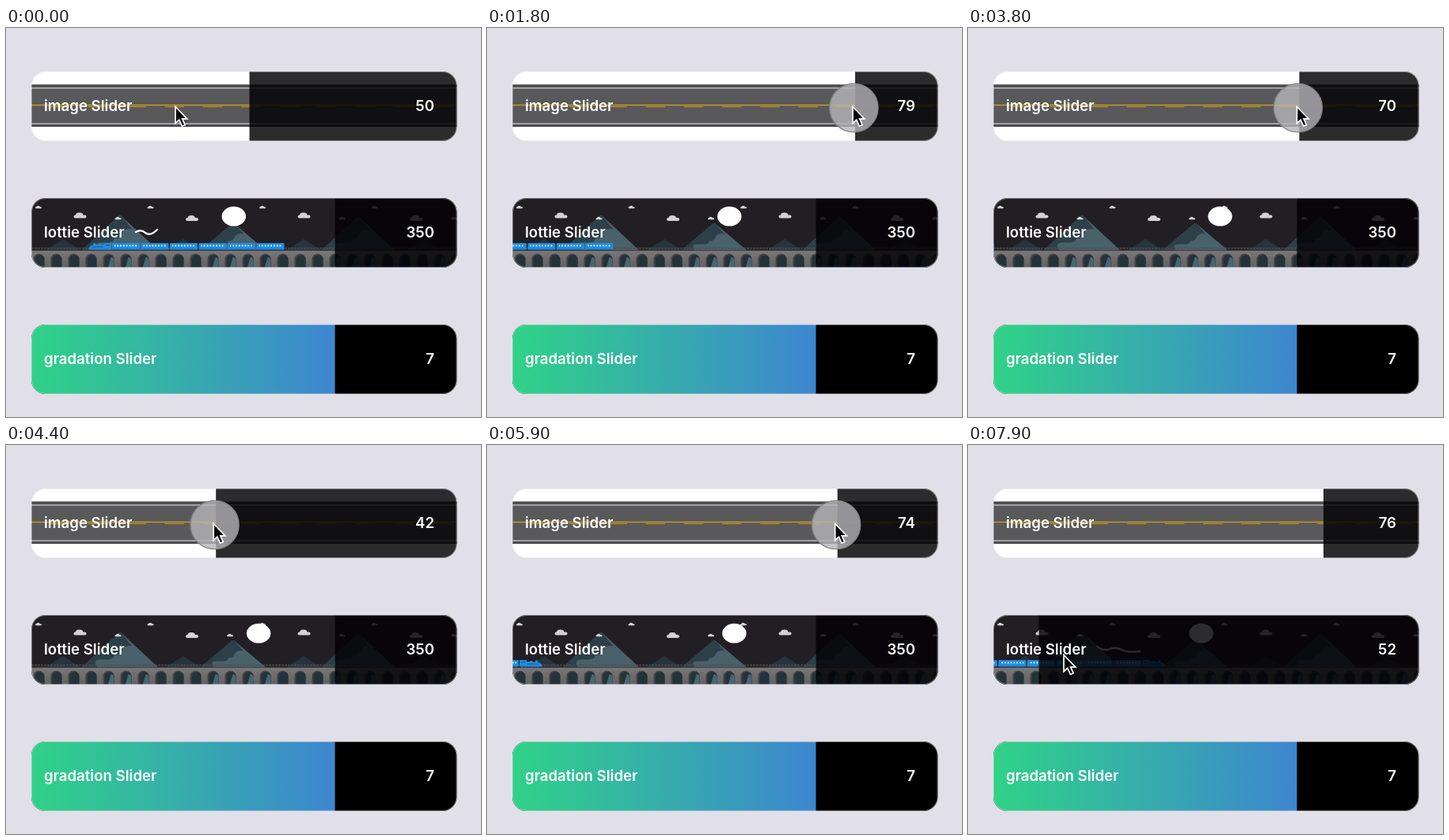
Write an HTML page that moves like this. It is 600 px wide and 492 px high and loops after 8 s.

```html
<!DOCTYPE html>
<html lang="en">
<head>
<meta charset="utf-8">
<title>Sliders</title>
<style>
  html, body { margin: 0; width: 100%; height: 100%; overflow: hidden; background: #e1dfe8; }
  svg { display: block; width: 100vw; height: 100vh; }
  text { font: 600 18.6px Inter, "Liberation Sans", sans-serif; fill: #fff; }
  .value { text-anchor: end; }
</style>
</head>
<body>
<svg viewBox="0 0 600 492">
  <defs>
    <clipPath id="card"><rect x="32" width="537.5" height="88" rx="18"/></clipPath>
    <rect id="rim" x="32.5" y=".5" width="536.5" height="87" rx="17.5" fill="none" stroke="#e1dfe8" stroke-opacity=".45"/>
    <linearGradient id="blend" gradientUnits="userSpaceOnUse" x1="32" x2="415.5">
      <stop stop-color="#30d287"/><stop offset="1" stop-color="#3d86d0"/>
    </linearGradient>
    <linearGradient id="stone" x2="0" y2="1">
      <stop stop-color="#7a7879"/><stop offset="1" stop-color="#626162"/>
    </linearGradient>
    <g id="cloud" fill="#d3d2d4">
      <rect x="-8" y="-.4" width="16" height="4" rx="2"/>
      <ellipse cx="-.8" cy="-.2" rx="4.6" ry="3.2"/>
    </g>
    <g id="arch">
      <path d="M-7 24V12a7 6.5 0 0 1 14 0V24Z" fill="#434245"/>
      <path d="M-5 24V12.5a6 5.5 0 0 1 12 0V24Z" fill="#25323a"/>
    </g>
    <path id="glimpse" d="M-1 24L3 10Q7 10 7 14V24Z" fill="#4a6670"/>
    <g id="car">
      <path d="M1 0H34Q35 0 35 1V8H0V1Q0 0 1 0Z" fill="#218ddf"/>
      <path d="M4 3.3H32" stroke="#e6f3fc" stroke-width="1.8" stroke-dasharray="1.9 1.9"/>
      <path d="M1 8.3H34" stroke="#17588c" stroke-width="1.2"/>
    </g>
    <g id="engine">
      <path d="M0 0H9V2H13V1H16V2.3H20V.2H23V2.5Q27 3 28 6L29 8H0Z" fill="#218ddf"/>
      <path d="M2 2.6H7M10 5H24" stroke="#125d9d" stroke-width="1.2"/>
      <path d="M2 8.2H27" stroke="#1d6eb0" stroke-width="1.6" stroke-dasharray="3 1"/>
    </g>
  </defs>

  <g transform="translate(0 55)">
    <g clip-path="url(#card)">
      <path d="M32 0H570V88H32Z" fill="#fff"/>
      <path d="M32 16.6H570V70H32Z" fill="#59585a"/>
      <path d="M32 18H570M32 68.8H570" stroke="#4b4a4c" stroke-width="2.4"/>
      <path d="M32 21H570M32 66H570" stroke="#eae9eb" stroke-width="1.2"/>
      <path d="M32 42.6H570" stroke="#c99a1d" stroke-width="1.5"/>
      <path d="M56 44.6H570" stroke="#c99a1d" stroke-dasharray="24.5 23.7"/>
      <rect id="shade1" height="88" fill="#020004" opacity=".83"/>
    </g>
    <use href="#rim"/>
    <text x="48" y="50">image Slider</text>
    <text id="value1" class="value" x="541" y="50"></text>
  </g>

  <g transform="translate(0 215)">
    <g clip-path="url(#card)">
      <path d="M32 0H570V88H32Z" fill="#211f23"/>
      <g id="hills"></g>
      <g id="clouds"></g>
      <ellipse id="moon" cy="23.2" rx="15.2" ry="12.4" fill="#fff"/>
      <path d="M32 63.5H570" stroke="#4f4e51" stroke-width="1.5" stroke-dasharray="3 1"/>
      <path d="M32 66H570V88H32Z" fill="url(#stone)"/>
      <path d="M32 66.4H570" stroke="#454447" stroke-width="1.4"/>
      <g id="arches"></g>
      <g id="train"></g>
      <path id="smoke" fill="none" stroke="#f4f4f4" stroke-width="2.4" stroke-linecap="round"/>
      <rect id="shade2" height="88" fill="#020004" opacity=".83"/>
    </g>
    <use href="#rim"/>
    <text x="48" y="50">lottie Slider</text>
    <text id="value2" class="value" x="541" y="50"></text>
  </g>

  <g transform="translate(0 375)">
    <g clip-path="url(#card)">
      <path d="M32 0H570V88H32Z"/>
      <path d="M32 0H415.5V88H32Z" fill="url(#blend)"/>
    </g>
    <use href="#rim"/>
    <text x="48" y="50">gradation Slider</text>
    <text class="value" x="541" y="50">7</text>
  </g>

  <g id="pointer">
    <circle id="touch" cx="1.4" cy="2" r="30.6" fill="#b6b5b7" fill-opacity=".8" stroke="#858487" stroke-width="1.4"/>
    <path d="M0 .5V21.5L4.7 17.2L8.4 25.2L12.1 23.6L8.6 15.9H14.8Z" stroke="#fff" stroke-width="1.7"/>
  </g>
</svg>

<script>
const LOOP = 8000, STEP = 100, LEFT = 32, RIGHT = 570, TRACK = 547.8;
const CAR = 36.5, CARS = 6, ENGINE = 29, TURN = 4250, GRIP = 3;
const el = id => document.getElementById(id);
const set = (node, attrs) => { for (const k in attrs) node.setAttribute(k, attrs[k]); };
const repeat = (n, make) => Array.from({ length: n }, (_, i) => make(i)).join("");
const use = (id, x, y, extra = "") => `<use href="#${id}" transform="translate(${x} ${y}) ${extra}"/>`;
const ease = (t, from, to) => {
  const u = Math.min(1, Math.max(0, (t - from) / (to - from)));
  return (1 - Math.cos(Math.PI * u)) / 2;
};

const bigHill = (x, y, w) => {
  const h = 66 - y, outline = `M${x - w} 66L${x - 2} ${y + 1}Q${x} ${y - 1} ${x + 2} ${y + 1}`;
  return `<path d="${outline}L${x + w} 66Z" fill="#49616b"/>
    <path d="${outline}L${x + w * .32} ${y + h * .4}q${-w * .2} ${-h * .06} ${-w * .28} ${h * .12}
      t${-w * .2} ${h * .12}q${w * .04} ${h * .16} ${-w * .28} ${h * .14}T${x - w * .6} 66Z" fill="#2d3f48"/>`;
};
const smallHill = (x, y, w) => `<path d="M${x - w} 66L${x} ${y}L${x + w} 66Z" fill="#26343c"/>`;

el("hills").innerHTML =
  repeat(4, i => smallHill(72 + 152 * i, 52, 22)) +
  bigHill(144, 22, 48) + bigHill(287, 32, 41) + bigHill(445, 24, 46);
el("clouds").innerHTML = repeat(4, i => {
  const x = 141.5 * i;
  return use("cloud", 41 + x, 11.5, "scale(.5)") + use("cloud", 93.5 + x, i % 2 ? 25.5 : 22) +
    use("cloud", 141.5 + x, 25.5, "scale(.5)");
});
el("arches").innerHTML = repeat(25, i =>
  use("arch", 41.5 + 22 * i, 65) + (Math.sin(i * .95 - 3) > 0 ? use("glimpse", 41.5 + 22 * i, 65) : ""));
el("train").innerHTML =
  repeat(CARS, i => use("car", -ENGINE - CAR * (i + 1) + .5, 57)) + use("engine", -ENGINE, 57);

// Pointer moves: start, end, destination
const moves = [[100, 400, 200], [600, 1000, 429], [1300, 2400, 506], [3130, 5000, 188],
  [5000, 6000, 446], [6300, 7000, 117], [7300, 7600, 86.5], [7650, 7900, 121]];
const presses1 = [[200, 500], [1200, 2500], [3000, 6200]];
const presses2 = [[7300, 7650]];

const pointerX = t => moves.reduce((x, [from, to, goal]) => x + (goal - x) * ease(t, from, to), 214);
const pointerY = t => 99 + 166 * ease(t, 6300, 7000);

// The edge follows the pointer while pressed and stays where it was released
const edgeAt = (t, presses, rest) => presses.reduce(
  (x, [down, up]) => t < down ? x : pointerX(Math.min(t, up)) + GRIP, rest);

function setSlider(n, edge, max) {
  set(el("shade" + n), { x: edge, width: RIGHT - edge });
  el("value" + n).textContent = Math.floor((edge - LEFT) / TRACK * max);
}

function draw(t) {
  setSlider(1, edgeAt(t, presses1, 307.5), 100);
  setSlider(2, edgeAt(t, presses2, 415.5), 500);

  // Moon and train slow down towards the turn, then come back
  const sway = Math.abs(t / TURN - 1) ** 1.6;
  const outbound = t < TURN;
  const nose = outbound ? 24 + 328 * sway - CAR * CARS - ENGINE : 318 * sway;
  set(el("moon"), { cx: 319.3 - 31.5 * sway });
  set(el("train"), { transform: `translate(${nose})` + (outbound ? " scale(-1 1)" : "") });
  set(el("smoke"), {
    d: outbound ? "M60 43q6-4 12 1t15-4" : "M-86 40q8 6 16 3t15 1t23 2",
    transform: `translate(${nose})`,
    visibility: t < 600 || t > 7400 ? "visible" : "hidden"
  });

  set(el("pointer"), { transform: `translate(${pointerX(t)} ${pointerY(t)})` });
  const pressed = [...presses1, ...presses2].some(([down, up]) => t >= down && t < up);
  set(el("touch"), { visibility: pressed ? "visible" : "hidden" });
}

const start = performance.now();
function tick() {
  const t = (performance.now() - start) % LOOP;
  draw(Math.floor(t / STEP) * STEP);
  requestAnimationFrame(tick);
}
tick();
</script>
</body>
</html>
```
